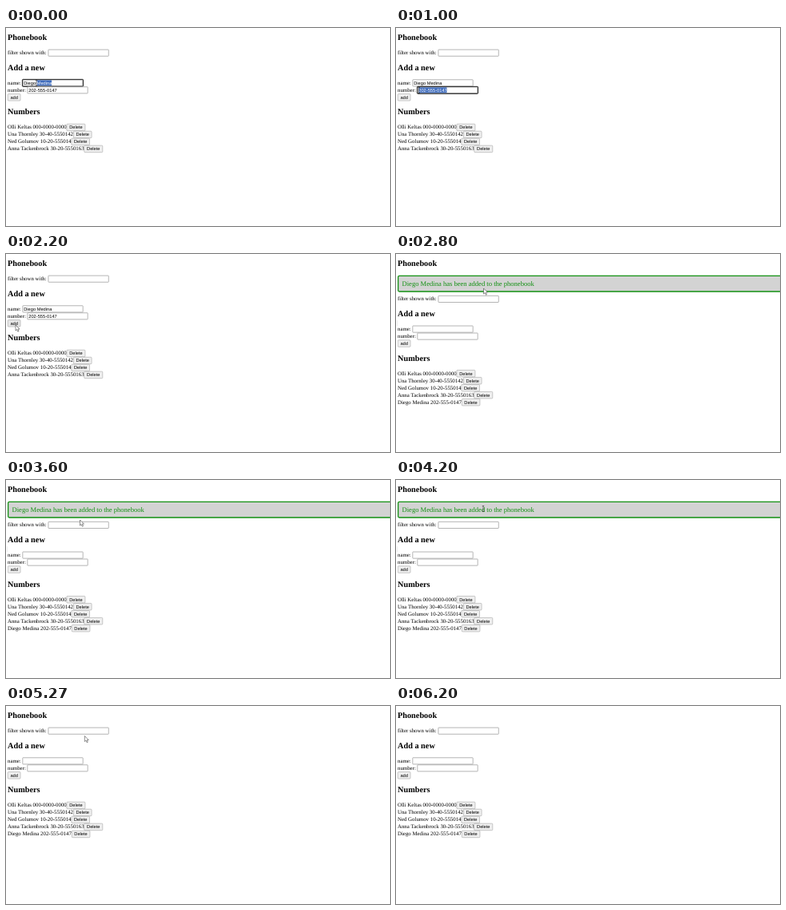
Animation of 480 by 248 pixels, one loop 7740 ms. Source, as an HTML page:

```html
<!DOCTYPE html>
<html lang="en">
<head>
<meta charset="utf-8">
<title>Phonebook</title>
<style>
html, body { margin: 0; width: 100%; height: 100%; overflow: hidden; background: #fff; }
body { position: relative; }
#page {
  position: absolute; left: 2px; top: -1.9px; width: 1200px;
  transform: scale(.428); transform-origin: 0 0;
  font: 16px/21px "Liberation Serif", "Times New Roman", serif;
  text-rendering: geometricPrecision;
}
h2 { margin: 20px 0; font-size: 24px; line-height: 27px; }
.row { display: flex; height: 21px; white-space: pre; }
.note {
  margin-bottom: 10px; padding: 10px; border: 3px solid #129012; border-radius: 5px;
  background: #d3d3d3; color: #129012; font-size: 20px; line-height: 23px;
}
.field, button {
  box-sizing: border-box; height: 21px; color: #000;
  font: 13.333px/17px "Liberation Sans", Arial, sans-serif;
}
.field { position: relative; width: 178px; padding-left: 2px; border: 2px solid #a8a8a8; border-radius: 2px; }
.field.focus { border-color: #444; outline: 2px solid #181818; outline-offset: -1px; }
mark { position: absolute; left: 2px; top: 0; background: #3f6cbd; color: #fff; }
button { margin: 0; padding: 0 7px; border: 1px solid #858585; border-radius: 3px; background: #efefef; }
button.hover { background: #e6e6e6; }
svg { position: absolute; inset: 0; width: 480px; height: 248px; }
.hidden { display: none; }
</style>
</head>
<body>
<div id="page"></div>
<svg viewBox="0 0 480 248">
  <path id="beam" d="M-1.2-3.5H1.2M0-3.5V3.5M-1.2 3.5H1.2" stroke="#222" stroke-width=".6"/>
  <path id="arrow" d="M0 0V7L1.6 5.5 2.8 8.2 4 7.7 2.9 5.1H5Z" fill="#fff" stroke="#222" stroke-width=".5"/>
</svg>
<script>
const person = "Diego Medina", phone = "202-555-0147";
const people = [
  "Olli Keltas 000-0000-0000",
  "Una Thornley 30-40-5550142",
  "Ned Golumov 10-20-555014",
  "Anna Tackenbrock 30-20-5550163",
  `${person} ${phone}`
];

const get = id => document.getElementById(id);
const show = (id, on) => get(id).classList.toggle("hidden", !on);
const row = (content, id = "") => `<div class="row" id="${id}">${content}</div>`;
const field = (label, id, value = "") => row(
  `${label}: <span class="field" id="${id}"><span id="${id}Text">${value}</span><mark id="${id}Mark">${value}</mark></span>`);

get("page").innerHTML =
  "<h2>Phonebook</h2>" +
  `<div class="note" id="note">${person} has been added to the phonebook</div>` +
  field("filter shown with", "filter") +
  "<h2>Add a new</h2>" +
  field("name", "name", person) +
  field("number", "number", phone) +
  row('<button id="add">add</button>') +
  "<h2>Numbers</h2>" +
  people.map((p, i) => row(p + "<button>Delete</button>", "person" + i)).join("");

// Pointer stops: step (1/15 s), x, y
const stops = [
  [0, 38, 69], [2, 10, 70], [6, 109, 145], [9, 64, 78], [13, 28.6, 78], [19, 50, 72], [28, 12, 89],
  [37, 38, 152], [42, 109.5, 43], [45, 169, 37], [49, 17, 44], [54, 92.5, 50], [57, 132, 37],
  [63, 109, 36], [67, 30, 176], [69, 10, 104], [76, 98.3, 37.5], [86, 301, 6], [120, 301, 6]
];

const clamp = v => Math.min(1, Math.max(0, v));
const ease = k => k * k * (3 - 2 * k);

// The pointer rests at a stop, then takes at most four steps to the next
function pointer(step) {
  const i = stops.findIndex(s => s[0] > step);
  const [a, x, y] = stops[i - 1], [b, u, v] = stops[i];
  const time = Math.min(4, b - a);
  const k = ease(clamp((step - b + time) / time));
  return [x + (u - x) * k, y + (v - y) * k];
}

// Highlights the text from a fraction of its width to its end
function select(id, on, from) {
  show(id + "Mark", on);
  get(id + "Mark").style.clipPath = `inset(0 0 0 ${from * 100}%)`;
}

function draw(ms) {
  const step = Math.floor(ms * .015 + .1);
  const added = step >= 34, note = added && step < 79;
  const [x, y] = pointer(step);

  show("note", note);
  show("person4", added);
  for (const id of ["name", "number"]) show(id + "Text", !added);
  get("name").classList.toggle("focus", step < 8);
  get("number").classList.toggle("focus", step >= 8 && step < 31);
  select("name", step < 8, step ? 0 : .47);
  select("number", step >= 8 && step < 22, 1 - clamp((step - 9) / 4));
  get("add").classList.toggle("hover", step >= 28 && !added);

  const visible = step < 74 || step > 75 && step < 89;
  const overForm = step < 28 && y > 65 && y < 82 && x < 102;
  const overNote = note && y > 29 && y < 42.5 && x > 7 && x < 174;
  const beam = overForm || overNote;
  show("beam", visible && beam);
  show("arrow", visible && !beam);
  get(beam ? "beam" : "arrow").setAttribute("transform", `translate(${x} ${y})`);
}

const start = performance.now();
function tick() {
  draw((performance.now() - start) % 7740);
  requestAnimationFrame(tick);
}
tick();
</script>
</body>
</html>
```
